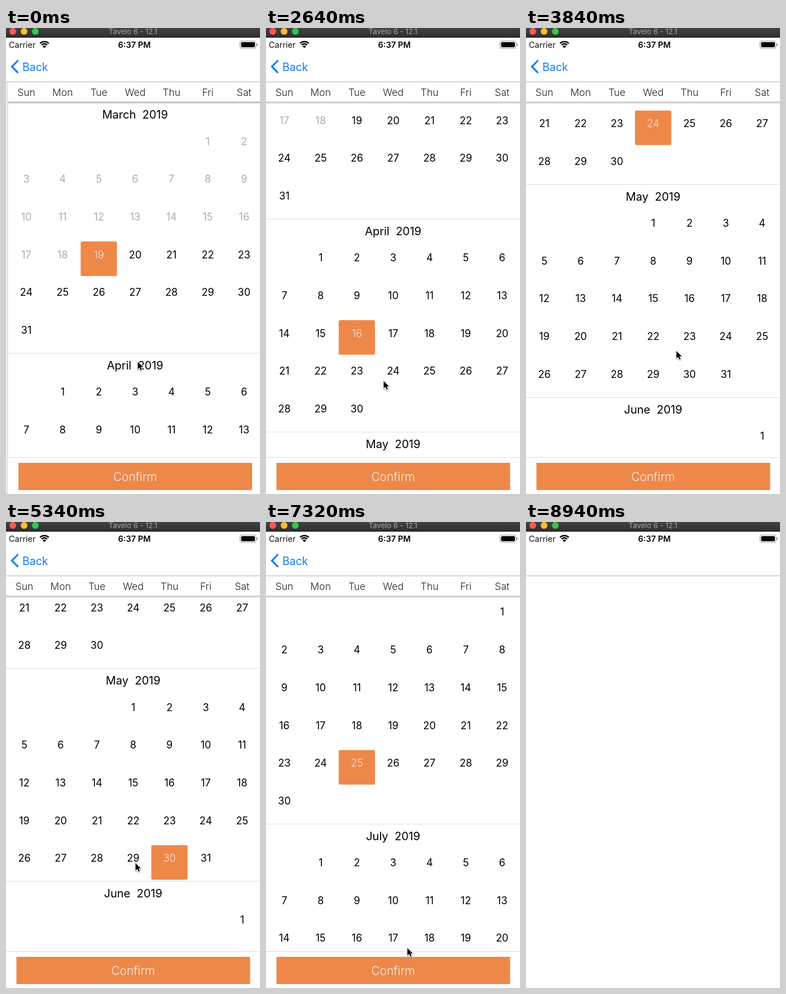
Recreate the animation shown at these times as an HTML page with a canvas. Size 450 px wide and 823 px high, loop 9.06 s.

```html
<!DOCTYPE html>
<html lang="en">
<head>
<meta charset="utf-8">
<title>Calendar picker</title>
<style>
html, body { margin: 0; width: 100%; height: 100%; overflow: hidden; background: #fff; }
canvas { display: block; width: 100%; height: 100%; }
</style>
</head>
<body>
<canvas id="stage" width="450" height="823"></canvas>
<script>
const ctx = document.getElementById('stage').getContext('2d');
const W = 450, H = 823, LOOP = 9060, STEP = 60;
const COL = 64.3, ROW = 66.7, HEAD = 42.4;
const ORANGE = '#ee8849', BLUE = '#147efb';
const WEEKDAYS = ['Sun', 'Mon', 'Tue', 'Wed', 'Thu', 'Fri', 'Sat'];

// Month blocks, stacked from the start of the list
let nextY = 131.3;
const months = ['March', 'April', 'May', 'June', 'July', 'August'].map((name, i) => {
  const first = new Date(Date.UTC(2019, i + 2, 1)).getUTCDay();
  const days = new Date(Date.UTC(2019, i + 3, 0)).getUTCDate();
  const month = { name, first, days, y: nextY };
  nextY += HEAD + ROW * Math.ceil((first + days) / 7);
  return month;
});

const pull = (start, length, distance) => ({ start, length, distance });
const pulls = [pull(900, 1283, 237), pull(2880, 840, 437), pull(4000, 500, 17.5), pull(5460, 780, 544)];

const tap = (t, month, day) => ({ t, month, day });
const taps = [tap(-1, 0, 19), tap(720, 0, 29), tap(2220, 1, 16), tap(2760, 1, 24), tap(4920, 2, 30), tap(6540, 3, 25)];

const stop = (t, x, y) => ({ t, x, y });
const rests = [stop(0, 233, 589), stop(1440, 320, 497), stop(2640, 208, 623), stop(3840, 266, 570),
  stop(5340, 229, 602), stop(7320, 250, 752), stop(7800, 240, 790), stop(8520, 246, 840)];

// Progress from 0 to 1 between two times, eased at both ends
function ease(t, from, to) {
  const p = Math.min(1, Math.max(0, (t - from) / (to - from)));
  return p * p * (3 - 2 * p);
}

const scrollAt = t => pulls.reduce((sum, p) => sum + p.distance * ease(t, p.start, p.start + p.length), 0);
const slideAt = t => 3.5 * (1 - ease(t, 0, 120)) + 111 * ease(t, 8400, 8520) + 351 * ease(t, 8700, 8940);

function cell(month, day) {
  const slot = month.first + day - 1;
  return { x: (slot % 7) * COL, y: month.y + 68.7 + Math.floor(slot / 7) * ROW };
}

// The pointer visits its resting places and every tapped day
const path = taps.slice(1).map(({ t, month, day }) => {
  const { x, y } = cell(months[month], day);
  return stop(t, x + 32, y + 6 - scrollAt(t));
}).concat(rests).sort((a, b) => a.t - b.t);

function cursorAt(t) {
  const a = path.findLast(p => p.t <= t);
  const b = path.find(p => p.t > t) || a;
  const e = a === b ? 0 : ease(t, a.t, b.t);
  return [a.x + (b.x - a.x) * e, a.y + (b.y - a.y) * e];
}

function text(str, x, midY, size, color, weight = 400, align = 'center') {
  ctx.font = `${weight} ${size}px Inter, "Open Sans", sans-serif`;
  ctx.textAlign = align;
  ctx.fillStyle = color;
  ctx.fillText(str, x, midY + size * 0.364);
}

function rect(x, y, w, h, color) {
  ctx.fillStyle = color;
  ctx.fillRect(x, y, w, h);
}

function round(x, y, w, h, r, color) {
  ctx.beginPath();
  ctx.roundRect(x, y, w, h, r);
  ctx.fillStyle = color;
  ctx.fill();
}

function disc(x, y, r, color) {
  ctx.beginPath();
  ctx.arc(x, y, r, 0, Math.PI * 2);
  ctx.fillStyle = color;
  ctx.fill();
}

function fade(x0, y0, x1, y1, from, to) {
  const g = ctx.createLinearGradient(x0, y0, x1, y1);
  g.addColorStop(0, from);
  g.addColorStop(1, to);
  return g;
}

function titleBar() {
  rect(0, 0, W, 16, fade(0, 0, 0, 16, '#414042', '#302f31'));
  rect(0, 16, W, 1, '#111');
  ['#fc5753', '#fdbc2f', '#33c748'].forEach((c, i) => disc(12 + i * 20, 6, 6, c));
  text('Tavelo 6 - 12.1', 225, 6.5, 13, '#a9a8a9');
}

function statusBar() {
  text('Carrier', 5, 29.5, 14.5, '#111', 400, 'left');
  text('6:37 PM', 227.5, 29.5, 14.5, '#000', 600);
  ctx.strokeStyle = '#000';
  ctx.lineWidth = 2.4;
  for (const r of [11, 7]) {
    ctx.beginPath();
    ctx.arc(68, 35, r, -Math.PI * 0.75, -Math.PI * 0.25);
    ctx.stroke();
  }
  ctx.beginPath();
  ctx.moveTo(68, 35.5);
  ctx.arc(68, 35.5, 4.4, -Math.PI * 0.75, -Math.PI * 0.25);
  ctx.fillStyle = '#000';
  ctx.fill();
  ctx.beginPath();
  ctx.roundRect(414.5, 23, 28.5, 13, 3.5);
  ctx.strokeStyle = '#8d8d8d';
  ctx.lineWidth = 1;
  ctx.stroke();
  round(416.5, 25, 24.5, 9, 2, '#000');
  round(444.2, 27.5, 1.8, 4, 1, '#8d8d8d');
}

function backButton(alpha) {
  ctx.globalAlpha = alpha;
  ctx.beginPath();
  ctx.moveTo(21.5, 57);
  ctx.lineTo(10.5, 68.2);
  ctx.lineTo(21.5, 79.4);
  ctx.strokeStyle = BLUE;
  ctx.lineWidth = 3.2;
  ctx.stroke();
  text('Back', 29, 68.5, 19.5, BLUE, 400, 'left');
  ctx.globalAlpha = 1;
}

function monthBlock(month, index, scroll, pick) {
  const y = month.y - scroll;
  if (y > 758 || y + 460 < 132) return;
  rect(0, Math.round(y), W, 1, '#dedede');
  text(`${month.name}  2019`, 225.2, y + 21.8, 20, '#000');
  for (let day = 1; day <= month.days; day++) {
    const at = cell(month, day);
    const mid = at.y - scroll;
    const chosen = pick.month === index && pick.day === day;
    const past = index === 0 && day < 19;
    if (chosen) round(at.x + 0.2, mid - 23, COL, 61, 2.5, ORANGE);
    text(day, at.x + 32.5, mid, 18, chosen ? '#fbe6d8' : past ? '#adadad' : '#000', chosen ? 300 : 400);
  }
}

function page(t) {
  const dx = slideAt(t);
  if (dx >= W) return;
  const scroll = scrollAt(t);
  const pick = taps.findLast(p => p.t <= t);
  ctx.save();
  ctx.translate(dx, 0);
  rect(0, 96, W, H - 96, '#fff');
  if (dx > 0) rect(-4, 96, 4, H - 96, fade(-4, 0, 0, 0, 'rgba(0,0,0,0)', 'rgba(0,0,0,.16)'));

  ctx.save();
  ctx.beginPath();
  ctx.rect(0, 131, W, 627);
  ctx.clip();
  months.forEach((m, i) => monthBlock(m, i, scroll, pick));
  ctx.restore();

  rect(0, 96, W, 35, '#fff');
  WEEKDAYS.forEach((d, i) => text(d, 32.5 + i * COL, 113.5, 17.5, '#222', 300));
  rect(0, 130, W, 5, fade(0, 130, 0, 135, 'rgba(0,0,0,.26)', 'rgba(0,0,0,0)'));

  rect(0, 758, W, 65, '#fff');
  rect(0, 758, W, 1, '#dcdcdc');
  rect(18.5, 768, 414, 48, ORANGE);
  text('Confirm', 225.2, 792, 20.8, '#fdeee4', 300);
  ctx.restore();
}

function cursor(x, y) {
  ctx.save();
  ctx.translate(x, y);
  ctx.lineJoin = 'round';
  ctx.lineWidth = 2.4;
  ctx.strokeStyle = '#fff';
  const arrow = new Path2D('M.5 .5V13.5L3.5 10.8L5.8 15.6L8 14.6L5.8 10L9.8 9.8Z');
  ctx.shadowColor = 'rgba(0,0,0,.4)';
  ctx.shadowBlur = 2;
  ctx.shadowOffsetY = 1;
  ctx.stroke(arrow);
  ctx.shadowColor = 'transparent';
  ctx.fillStyle = '#000';
  ctx.fill(arrow);
  ctx.restore();
}

function draw(now) {
  const t = Math.min(Math.floor((now % LOOP) / STEP) * STEP, LOOP - 2 * STEP);
  rect(0, 0, W, H, '#fff');
  page(t);
  rect(0, 94.5, W, 1.2, '#bcbcbc');
  titleBar();
  statusBar();
  backButton(1 - ease(t, 8400, 8520));
  cursor(...cursorAt(t));
}

function tick(now) {
  draw(Math.max(0, now));
  requestAnimationFrame(tick);
}
draw(0);
requestAnimationFrame(tick);
</script>
</body>
</html>
```
